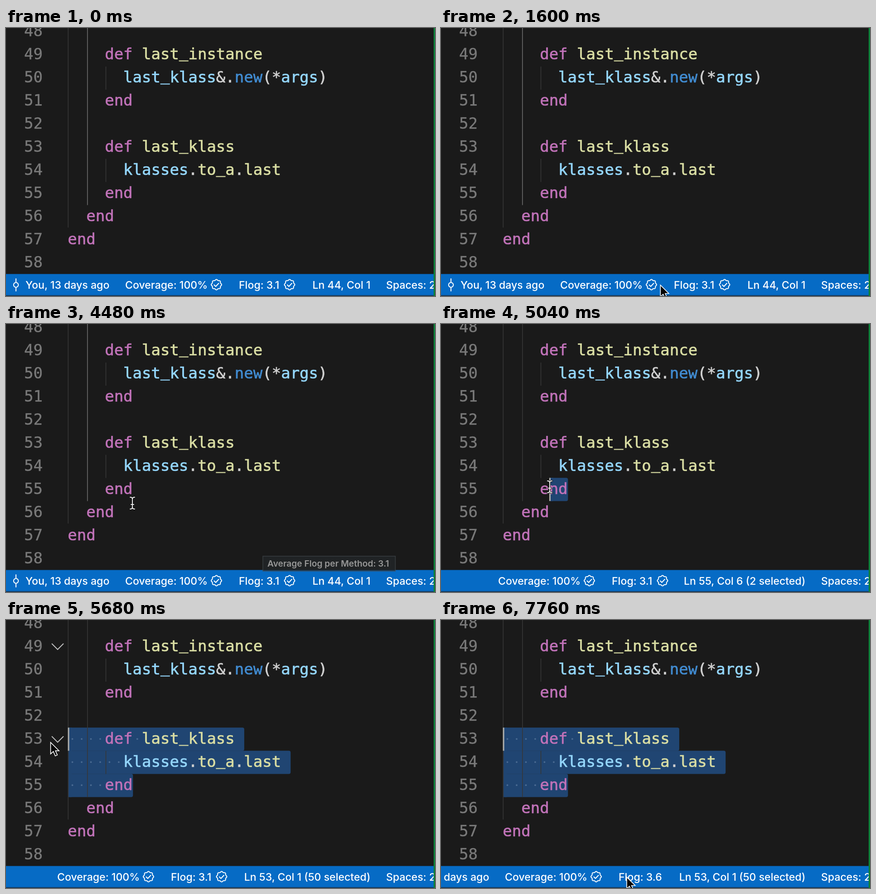
An HTML page that plays this animation: 947 by 591 pixels, repeating every 8 s.

```html
<!DOCTYPE html>
<html lang="en">
<head>
<meta charset="utf-8">
<title>Editor status bar</title>
<style>
  html, body { margin: 0; width: 100%; height: 100%; overflow: hidden; background: #1a1a1a; }
  svg { display: block; width: 947px; height: 591px; }
  text { white-space: pre; }
  .code { font: 34px "DejaVu Sans Mono", monospace; stroke-width: 0.7; }
  .code text, .code tspan { fill: currentColor; stroke: currentColor; }
  .number { color: #797979; stroke-width: 0.4; }
  .keyword { color: #c072b8; }
  .method { color: #d9dda3; }
  .variable { color: #94d6fb; }
  .builtin { color: #418bd0; }
  .plain { color: #d0d0d0; }
  .underscore { baseline-shift: 4px; }
  .status { font: 500 23.1px Inter, sans-serif; fill: #fff; }
  .tip { font: 600 19.2px Inter, sans-serif; fill: #ccc; }
  .line { fill: none; stroke: #fff; stroke-width: 2; stroke-linecap: round; stroke-linejoin: round; }
  .chevron { fill: none; stroke: #c5c5c5; stroke-width: 2; }
</style>
</head>
<body>
<svg viewBox="0 0 947 591">
  <rect width="947" height="591" fill="#1a1a1a"/>
  <g id="selection" fill="#204572"></g>
  <g fill="#373737">
    <rect x="136.5" width="1.6" height="440"/>
    <rect id="activeGuide" x="179" width="1.6" height="390.5"/>
    <rect x="219.7" y="85" width="1.6" height="51"/>
    <rect x="219.7" y="288.5" width="1.6" height="51"/>
  </g>
  <g id="code" class="code"></g>
  <rect id="caret" x="136.5" width="3" height="51" fill="#aeafad"/>
  <g id="chevrons" class="chevron">
    <path d="M101 52l13 13 13-13"/>
    <path d="M101 256.500l13 13 13-13"/>
  </g>
  <rect y="542.5" width="947" height="47" fill="#066bc5"/>
  <rect y="589.5" width="947" height="1.5" fill="#163a5c"/>
  <g class="status">
    <g id="items">
      <g id="blame">
        <path class="line" d="M22 553v8m0 11v8"/>
        <circle class="line" cx="22" cy="566.500" r="5.200"/>
        <text x="43" y="575">You, 13 days ago</text>
      </g>
      <text x="263" y="575">Coverage: 100%</text>
      <path class="line badge" transform="translate(464.500 566)"/>
      <text id="flog" x="514" y="575"></text>
      <path id="flogBadge" class="line badge" transform="translate(626 566)"/>
    </g>
    <text id="position" x="804.500" y="575" text-anchor="end"></text>
    <text x="839" y="575">Spaces: 2</text>
  </g>
  <g id="tooltip">
    <rect x="567" y="512" width="292.500" height="33" fill="#23282b" stroke="#454b50" stroke-width="1.500"/>
    <text class="tip" x="577" y="535">Average Flog per Method: 3.1</text>
  </g>
  <rect x="944" width="3" height="591" fill="#0b8038"/>
  <g id="pointer">
    <path id="arrow" d="M0 0V25.500l6-5.500 4.200 9.800 4.600-2-4.200-9.300h8z" fill="#050505" stroke="#fff" stroke-width="1.600"/>
    <g id="ibeam" fill="none" stroke-linecap="round">
      <path d="M-5-13q5 0 5 4V9q0 4-5 4M5-13q-5 0-5 4M0 9q0 4 5 4M-3 3h6" stroke="#111" stroke-width="4"/>
      <path d="M-5-13q5 0 5 4V9q0 4-5 4M5-13q-5 0-5 4M0 9q0 4 5 4M-3 3h6" stroke="#eee" stroke-width="2"/>
    </g>
    <g id="hand">
      <path d="M2 2c-2-4-6-1-4 3l5 11-4-2c-3-2-5 1-3 3l8 9c2 2 10 1 12-1 4-3 3-9 2-13-1-3-4-3-5-1-1-3-4-3-5-1-1-2-3-2-4-1z" fill="#fff" stroke="#111" stroke-width="1.400"/>
      <path d="M7 16l2 6m2-7l2 6m2-7l1 6" stroke="#111"/>
    </g>
  </g>
</svg>
<script>
const DURATION = 8000, LEFT = 136.3, CHAR = 20.47, ROW = 50.95, FIRST = 48, TOP = -17.4;
const PRESS = 4900, RELEASE = 5800, REFRESH = 6040;
const ANCHOR = { line: 55, col: 7 };
const $ = id => document.getElementById(id);
const show = (node, visible) => node.setAttribute('display', visible ? 'inline' : 'none');
const rowTop = line => TOP + (line - FIRST) * ROW;

// Indentation, then class and text pairs.
const lines = [
  [0],
  [4, 'keyword', 'def ', 'method', 'last_instance'],
  [6, 'variable', 'last_klass', 'plain', '&.', 'builtin', 'new', 'plain', '(*', 'variable', 'args', 'plain', ')'],
  [4, 'keyword', 'end'],
  [0],
  [4, 'keyword', 'def ', 'method', 'last_klass'],
  [6, 'variable', 'klasses', 'plain', '.', 'method', 'to_a', 'plain', '.', 'method', 'last'],
  [4, 'keyword', 'end'],
  [2, 'keyword', 'end'],
  [0, 'keyword', 'end'],
  [0]
];
const plainText = lines.map(([indent, ...parts]) =>
  ' '.repeat(indent) + parts.filter((_, i) => i % 2).join(''));
const markup = text => text.replace('&', '&amp;').replace('_', '<tspan class="underscore">_</tspan>');

$('code').innerHTML = lines.map(([indent, ...parts], i) => {
  const y = rowTop(FIRST + i) + 35.4;
  let spans = '';
  for (let k = 0; k < parts.length; k += 2)
    spans += `<tspan class="${parts[k]}">${markup(parts[k + 1])}</tspan>`;
  return `<text class="number" x="40" y="${y}">${FIRST + i}</text>` +
    `<text x="${LEFT + indent * CHAR}" y="${y}">${spans}</text>`;
}).join('');

let scallop = '';
for (let i = 0; i < 64; i++) {
  const a = i * Math.PI / 32, r = 10.6 + 0.9 * Math.cos(8 * a);
  scallop += `${i ? 'L' : 'M'}${r * Math.cos(a)} ${r * Math.sin(a)}`;
}
for (const badge of document.querySelectorAll('.badge'))
  badge.setAttribute('d', scallop + 'ZM-5 .5l3.500 3.500 6.500-7');

// Time, x, y of the pointer tip.
const path = [
  [1120, 300, 602], [1600, 484, 567], [1840, 567, 573], [4080, 567, 573],
  [4480, 279, 395], [4720, 281, 368], [4960, 281, 368], [5120, 200, 350],
  [5280, 107, 310], [5440, 103, 294], [5760, 97, 262], [6240, 91, 243],
  [6480, 91, 243], [7360, 410, 567], [8000, 410, 567]
];
const clamp = (v, lo, hi) => Math.min(hi, Math.max(lo, v));
const ramp = (t, start, end) => clamp((t - start) / (end - start), 0, 1);

function pointerAt(t) {
  const i = clamp(path.findIndex(p => p[0] > t), 1, path.length - 1);
  const [a, b] = [path[i - 1], path[i]];
  const k = ramp(t, a[0], b[0]);
  return { x: a[1] + (b[1] - a[1]) * k, y: a[2] + (b[2] - a[2]) * k };
}

function headAt(t) {
  const { x, y } = pointerAt(Math.min(t, RELEASE));
  const line = clamp(Math.floor((y - TOP) / ROW) + FIRST, FIRST, ANCHOR.line);
  const length = plainText[line - FIRST].length;
  return { line, col: clamp(Math.round((x - LEFT) / CHAR), 0, length) };
}

// Draws the highlighted rows with whitespace dots and returns the number of selected characters.
function select(head) {
  let shapes = '', count = 0;
  for (let line = head.line; line <= ANCHOR.line; line++) {
    const text = plainText[line - FIRST] + '\n';
    const from = line === head.line ? head.col : 0;
    const to = line === ANCHOR.line ? ANCHOR.col : text.length;
    const x = LEFT + 0.7 + from * CHAR, y = rowTop(line);
    if (to > from)
      shapes += `<rect x="${x}" y="${y}" width="${(to - from) * CHAR}" height="${ROW + 0.3}" rx="4"/>` +
        `<rect x="${x}" y="${y}" width="8" height="${ROW + 0.3}"/>`;
    for (let col = from; col < to; col++)
      if (text[col] === ' ')
        shapes += `<circle cx="${LEFT + (col + 0.5) * CHAR}" cy="${y + 25}" r="1.900" fill="#4a6b92"/>`;
    count += to - from;
  }
  $('selection').innerHTML = shapes;
  return count;
}

function render(t) {
  const pressed = t >= PRESS, refreshed = t >= REFRESH;
  const head = pressed ? headAt(t) : { line: 44, col: 0 };
  const count = pressed ? select(head) : 0;
  show($('selection'), count);
  $('activeGuide').setAttribute('fill', pressed ? '#373737' : '#6b6b6b');

  $('caret').setAttribute('x', LEFT + 0.3 + head.col * CHAR);
  $('caret').setAttribute('y', rowTop(head.line));
  show($('caret'), pressed && !(t >= 7260 && t < 7760));

  const shift = refreshed ? -122 : count > 9 ? -150 : count ? -137 : 0;
  $('items').setAttribute('transform', `translate(${shift})`);
  show($('blame'), t < 5040 || refreshed);
  $('flog').textContent = refreshed ? 'Flog: 3.6' : 'Flog: 3.1';
  show($('flogBadge'), !refreshed);
  $('position').textContent = `Ln ${head.line}, Col ${head.col + 1}` + (count ? ` (${count} selected)` : '');

  $('tooltip').setAttribute('opacity', ramp(t, 2740, 2960) * (1 - ramp(t, 4380, 4720)));
  $('chevrons').setAttribute('opacity', ramp(t, 5200, 5700) * (1 - ramp(t, 6800, 7300)));

  const { x, y } = pointerAt(t);
  const inText = x > 132 && y < 543;
  const onNumbers = x <= 132 && t > RELEASE;
  $('pointer').setAttribute('transform', `translate(${x} ${y})`);
  show($('pointer'), t >= 1120);
  show($('ibeam'), inText);
  show($('hand'), onNumbers);
  show($('arrow'), !inText && !onNumbers);
}

function frame() {
  render(performance.now() % DURATION);
  requestAnimationFrame(frame);
}
frame();
</script>
</body>
</html>
```
